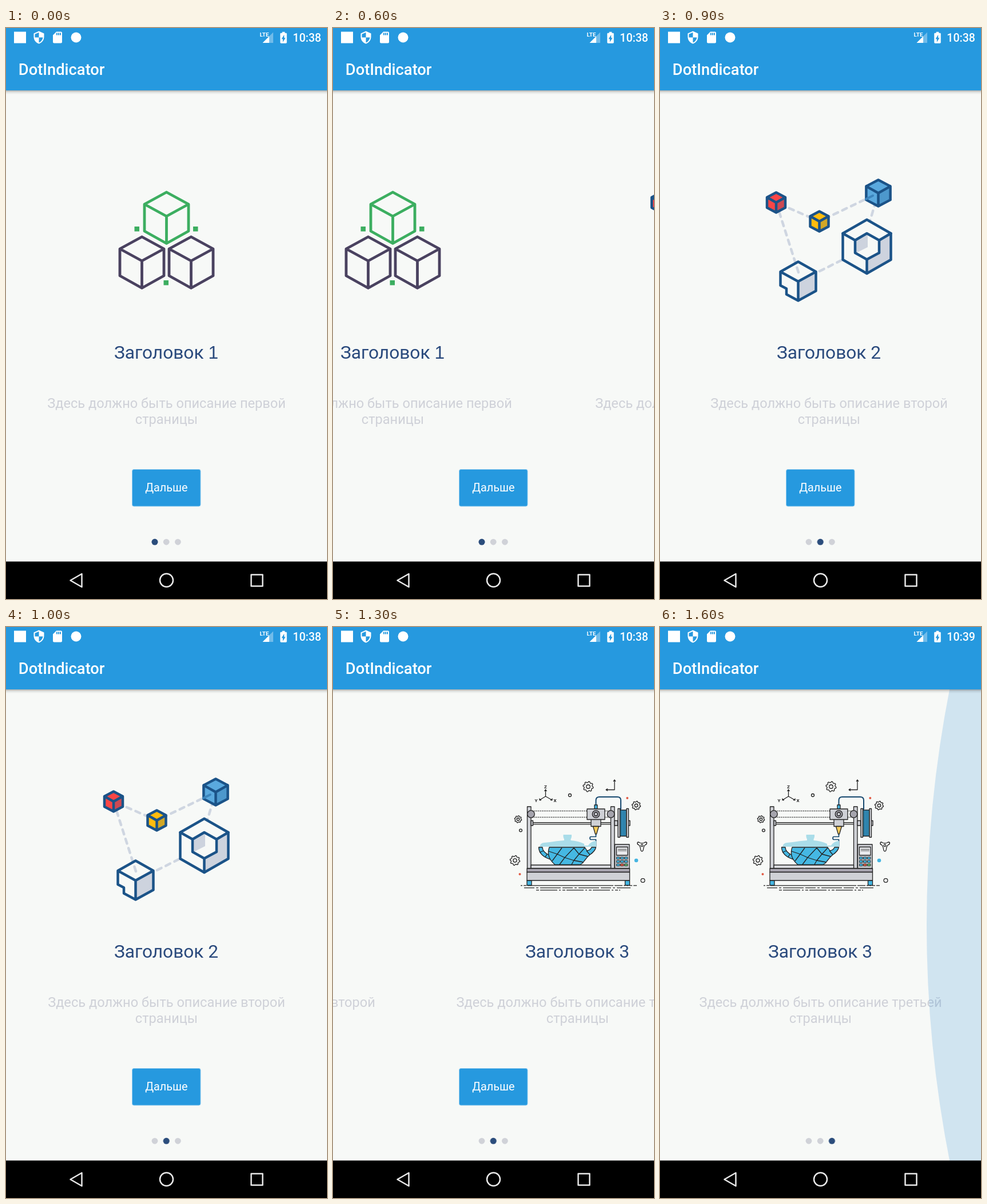
Write an HTML page that moves like this. It is 561 by 998 pixels and loops after 1700 ms.

```html
<!DOCTYPE html>
<html lang="ru">
<head>
<meta charset="utf-8">
<title>DotIndicator</title>
<style>
html, body { margin: 0; width: 100%; height: 100%; overflow: hidden; background: #f7f9f7; }
svg { display: block; width: 561px; height: 998px; }
text { font-family: Roboto, "Noto Sans", sans-serif; }
.head { font-size: 31.7px; fill: #2a4a7d; text-anchor: middle; }
.one { font-family: "Liberation Sans", Arial, sans-serif; }
.desc { font-size: 23.6px; fill: #cfd1d8; text-anchor: middle; }
.medium { font-weight: 500; fill: #fff; }
.axis text { font-size: 8px; font-weight: 700; fill: #222; stroke: none; text-anchor: middle; }

.pages, .active, .button, .before, .after, .glow { animation: 1700ms step-end infinite; }
.pages { animation-name: swipe; }
.active { animation-name: select; }
.button { animation-name: hide; }
.before { animation-name: leave; }
.after, .glow { animation-name: show; }

@keyframes swipe {
  0% { transform: translateX(0); }
  23.52% { transform: translateX(-31px); }
  29.4% { transform: translateX(-92px); }
  35.28% { transform: translateX(-176px); }
  41.16% { transform: translateX(-320px); }
  47.04% { transform: translateX(-468px); }
  52.92% { transform: translateX(-546px); }
  58.8% { transform: translateX(-561px); }
  64.68% { transform: translateX(-604px); }
  70.56% { transform: translateX(-768px); }
  76.44% { transform: translateX(-975px); }
  82.32% { transform: translateX(-1094px); }
  88.2%, 100% { transform: translateX(-1122px); }
}
@keyframes select {
  0% { transform: translateX(0); }
  52.92% { transform: translateX(20.2px); }
  82.32%, 100% { transform: translateX(40.4px); }
}
@keyframes hide { 0% { opacity: 1; } 82.32%, 100% { opacity: 0; } }
@keyframes leave { 0% { opacity: 1; } 94.1%, 100% { opacity: 0; } }
@keyframes show { 0% { opacity: 0; } 94.1%, 100% { opacity: 1; } }
</style>
</head>
<body>
<svg viewBox="0 0 561 998">
  <defs>
    <linearGradient id="shade" x2="0" y2="1">
      <stop offset="0" stop-color="#000" stop-opacity=".3"/>
      <stop offset=".45" stop-color="#000" stop-opacity=".09"/>
      <stop offset="1" stop-color="#000" stop-opacity="0"/>
    </linearGradient>
    <path id="frame" d="M0 0L38.5 21V68L0 89.5L-38.5 68V21ZM-38.5 21L0 42L38.5 21M0 42V89.5"/>
    <g id="cube">
      <path d="M0-17.5L16-9V9L0 17.5L-16 9V-9Z" stroke="none"/>
      <path d="M0 0L16-9V9L0 17.5Z" fill="#1b5388" fill-opacity=".2" stroke="none"/>
      <path d="M0-17.5L16-9V9L0 17.5L-16 9V-9ZM-16-9L0 0L16-9M0 0V17.5" fill="none" vector-effect="non-scaling-stroke"/>
    </g>
    <rect id="key" width="5.5" height="3.8"/>
    <clipPath id="area"><rect y="109" width="561" height="824"/></clipPath>
  </defs>

  <rect width="561" height="998" fill="#f7f9f7"/>

  <g clip-path="url(#area)">
    <g class="pages">
      <g>
        <g fill="none" stroke-width="4.8" stroke-linejoin="round">
          <use href="#frame" x="280.5" y="287" stroke="#3cae60"/>
          <g stroke="#4a4260">
            <use href="#frame" x="237.5" y="365"/>
            <use href="#frame" x="323.5" y="365"/>
          </g>
        </g>
        <path d="M224.5 347h8.5v8.5h-8.5zM327 347h8.5v8.5h-8.5zM275.5 441h8.5v8.5h-8.5z" fill="#3cae60"/>
        <text class="head" x="280" y="578">Заголовок <tspan class="one">1</tspan></text>
        <text class="desc" x="280.5" y="664">Здесь должно быть описание первой</text>
        <text class="desc" x="280.5" y="692">страницы</text>
      </g>

      <g transform="translate(561)">
        <path d="M227 427L188 305L263.5 338L366.5 288.5L352 337M302 406L256 429" fill="none" stroke="#cfd6e1" stroke-width="4.5" stroke-dasharray="8.5 8.5" stroke-linecap="round"/>
        <g stroke="#1b5388" stroke-width="4.5" stroke-linejoin="round" stroke-linecap="round">
          <use href="#cube" transform="translate(188 305)" fill="#fa4646"/>
          <use href="#cube" transform="translate(263.5 338)" fill="#ffbc0e"/>
          <use href="#cube" transform="translate(366.5 288.5) scale(1.32)" fill="#5aa9de"/>
          <path d="M345 299L357 293" stroke="#3c85bd" stroke-width="4"/>
          <g stroke="none" fill="#cdd3de">
            <path d="M388.5 359V405L346.5 429V404L368 393V371Z"/>
            <path d="M326 371L348 359V383L326 394Z"/>
            <path d="M226.5 443L257.5 426V459.5L226.5 476.5Z"/>
          </g>
          <g fill="none">
            <path d="M346.5 335L388.5 359V405L346.5 429L304.5 405V359Z"/>
            <path d="M346.5 359L368 371V393L346.5 404.5L326 393V371Z"/>
            <path d="M304.5 359L326 371M388.5 359L368 371M346.5 404.5V429"/>
            <path d="M226.5 408.5L257.5 426V459.5L226.5 476.5L206 465.5V455.5L195.5 450V426ZM195.5 426L226.5 443L257.5 426M226.5 443V476.5"/>
          </g>
        </g>
        <text class="head" x="280" y="578">Заголовок 2</text>
        <text class="desc" x="280.5" y="664">Здесь должно быть описание второй</text>
        <text class="desc" x="280.5" y="692">страницы</text>
      </g>

      <g transform="translate(1122)">
        <g stroke="#222" stroke-width="1.3" fill="none" stroke-linejoin="round">
          <path d="M202 321.5H297M202 332.5H297M328 321.5H338M328 332.5H338" stroke-width="1.6" stroke-dasharray="1.6 1.6"/>
          <path d="M199 342H352M199 344.8H352"/>

          <!-- posts, rod ends and wheels -->
          <g fill="#cfd1d6">
            <path d="M192.5 314h6.5v108h-6.5zM338.5 314h6.5v108h-6.5z"/>
            <path d="M199 338.5h3.5v8.5h-3.5zM345 338.5h5.5v8.5h-5.5zM369 338.5h3v8.5h-3z"/>
          </g>
          <g fill="#a5a4ad">
            <circle cx="199" cy="327" r="6.3"/>
            <circle cx="338.5" cy="327" r="6.3"/>
          </g>

          <!-- spool and cable -->
          <path d="M355 320h10.5v45.5H355z" fill="#45b5e1"/>
          <path d="M357.5 320v45M360.2 320v45M362.9 320v45" stroke="#15486e" stroke-width="1.2"/>
          <path d="M351 317.5h3.5v50H351zM366 317.5h3.5v50H366z" fill="#cfd1d6"/>
          <path d="M312.5 311V303q0-6 6-6h31.5q6 0 6 6V319" stroke="#15486e" stroke-width="2"/>

          <!-- print head -->
          <path d="M310 311h5v7h-5z" fill="#45b5e1"/>
          <path d="M297 318h31v18.5h-31zM304 336.5h17V348.5h-17z" fill="#cfd1d6"/>
          <circle cx="312.5" cy="327" r="6.3" fill="#a5a4ad"/>
          <circle cx="312.5" cy="327" r="3" fill="#cfd1d6"/>
          <path d="M307.5 348.5h10L313.5 362h-2z" fill="#f6cd5c"/>
          <path d="M312.5 362V366.5H304q-2 0-2 2.5t2 2.5h8.5V384" stroke="#15486e" stroke-width="1.7"/>

          <!-- teapot -->
          <path d="M214 384Q216 377 222 377L232 376Q243 374 257 373V371L255.5 367V363H270V367L268.5 371V373Q282 374 292 379V382H299Q304 374 313 374V384Z" fill="#aadde9" stroke="none"/>
          <path d="M212.500 385H219Q219 393 231 399L236 407Q213 401 212.500 385Z" fill="#45b8e3"/>
          <path d="M231 385H293L297 391Q303 390 305 385H312.500Q311 392 302 398Q297 402 292 409Q289 414 284 415.500H241Q225 402 231 385Z" fill="#45b8e3"/>
          <path d="M230 392L245 397L253 386M245 397L236 409M245 397L258 403L274 386M258 403L249 415M258 403L274 408L283 397L274 386M274 408L270 415M283 397L293 386M283 397L298 401M274 408L290 411M296 391L302 398M214 394L221 391M224 402L227 397"/>

          <!-- control panel -->
          <path d="M345.5 380H371V422H345.5z" fill="#cfd1d6"/>
          <path d="M348.5 384.5H368V399H348.5z" fill="#e9eaed"/>
          <path d="M351 388.5H366M351 391H366" stroke-width=".8"/>
          <g stroke-width=".9" fill="#45b5e1">
            <use href="#key" x="348.5" y="402"/><use href="#key" x="355.5" y="402"/><use href="#key" x="362.5" y="402"/>
            <use href="#key" x="348.5" y="408"/><use href="#key" x="355.5" y="408"/><use href="#key" x="362.5" y="408"/>
            <use href="#key" x="348.5" y="414"/>
            <use href="#key" x="355.5" y="414" fill="#e25b45"/>
            <use href="#key" x="362.5" y="414" fill="#5cb56d"/>
          </g>

          <!-- base -->
          <path d="M199 416H338.5V422H199z" fill="#d9dade"/>
          <path d="M192 443h8v8.5h-8zM363.5 443h8v8.5h-8z" fill="#45b5e1"/>
          <path d="M192 422H371.5V428.5H192z" fill="#a8a5b0"/>
          <path d="M192 428.5H371.5V443H192z" fill="#cfd1d6"/>
          <path d="M181 451.8H384" stroke-dasharray="3 2 5 2 150 2 14 2 3 2"/>
          <path d="M187 455.8H373" stroke-dasharray="18 3 4 3 36 3"/>
          <path d="M208 459.8H355" stroke-dasharray="5 2 30 3 3 3"/>

          <!-- floating marks -->
          <g id="gears"></g>
          <circle cx="267" cy="294" r="2.5"/>
          <circle cx="181" cy="355.5" r="2.4"/>
          <circle cx="394.5" cy="443" r="3.4"/>
          <path d="M345 267.5V284.5H330M343 270L345 267L347 270M333 282.5L330 284.5L333 286.5"/>
          <g class="axis">
            <path d="M224.5 296V284.5M224.5 296L214 302.5M224.5 296L236 302.5M222.5 287L224.5 284L226.5 287M214 299.5V302.5H217M233 302.5H236V299.5"/>
            <text x="224.5" y="282">Z</text>
            <text x="208" y="306">Y</text>
            <text x="241" y="306">X</text>
          </g>
          <path d="M385 377Q386 375 389 377Q393 379 397 377Q400 375 401.5 377Q401.5 380 398.5 381Q396 383 395.5 388Q395 392 393 392Q391 392 390.5 388Q390 383 387.5 381Q384.5 380 385 377Z"/>
          <circle cx="393" cy="382" r="1.8"/>
        </g>
        <g fill="#e25b45"><circle cx="367.3" cy="299" r="2"/><circle cx="179.5" cy="432" r="2"/></g>
        <circle cx="383" cy="408" r="3.3" fill="#45b5e1"/>
        <text class="head" x="280" y="578">Заголовок 3</text>
        <text class="desc" x="280.5" y="664">Здесь должно быть описание третьей</text>
        <text class="desc" x="280.5" y="692">страницы</text>
      </g>
    </g>
    <circle class="glow" cx="2603" cy="521" r="2137" fill="#2a8ad4" fill-opacity=".185"/>
  </g>

  <g class="button">
    <rect x="220.5" y="771.5" width="119.5" height="64.5" rx="3" fill="#2699df" stroke="#8fcbee"/>
    <text x="280.3" y="810.3" font-size="19.8" fill="#fff" text-anchor="middle">Дальше</text>
  </g>

  <g fill="#d0d2d8">
    <circle cx="260" cy="898.3" r="5.4"/>
    <circle cx="280.2" cy="898.3" r="5.4"/>
    <circle cx="300.4" cy="898.3" r="5.4"/>
  </g>
  <g class="active">
    <circle cx="260" cy="898.3" r="5.5" fill="#2b4d7c"/>
  </g>

  <rect y="109" width="561" height="7" fill="url(#shade)"/>
  <rect width="561" height="109" fill="#2699df"/>
  <text class="medium" x="21.8" y="81.7" font-size="27.3">DotIndicator</text>

  <g fill="#fff">
    <rect x="14" y="6.5" width="21" height="20"/>
    <path transform="translate(45.5 4.5)" d="M12 1L3 5v6c0 5.55 3.84 10.74 9 12 5.16-1.26 9-6.45 9-12V5l-9-4zm0 10.99h7c-.53 4.12-3.28 7.79-7 8.94V12H5V6.3l7-3.11v8.8z"/>
    <path transform="translate(78 4.5)" d="M18 2h-8L4 8V20c0 1.1.9 2 2 2h12c1.1 0 2-.9 2-2V4c0-1.1-.9-2-2-2zm-6 6h-2V4h2v4zm3 0h-2V4h2v4zm3 0h-2V4h2v4z"/>
    <circle cx="122.5" cy="16.5" r="9"/>
    <path d="M448.5 26L467 7.5V26Z" opacity=".35"/>
    <path d="M448.5 26L460 14.5V26Z"/>
    <text x="443.5" y="15" font-size="9.8" font-weight="700">LTE</text>
    <path transform="translate(471.2 4.7) scale(1.15 1)" d="M15.67 4H14V2h-4v2H8.33C7.6 4 7 4.6 7 5.33v15.33C7 21.4 7.6 22 8.33 22h7.33c.74 0 1.34-.6 1.34-1.33V5.33C17 4.6 16.4 4 15.67 4zM11 20v-5.5H9L13 7v5.5h2L11 20z"/>
  </g>
  <g font-size="19.5">
    <text class="medium before" x="501.3" y="24.3">10:38</text>
    <text class="medium after" x="501.3" y="24.3">10:39</text>
  </g>

  <rect y="932.5" width="561" height="66"/>
  <g fill="none" stroke="#e8e8e8" stroke-width="2.5" stroke-linejoin="round">
    <path d="M112.5 965.5L132.5 954V977Z"/>
    <circle cx="280.5" cy="965.3" r="11.5"/>
    <rect x="428.5" y="955.5" width="20" height="20"/>
  </g>
</svg>
<script>
// Outline of a gear with eight teeth and a round hole
function gear(x, y, r) {
  const teeth = 8, points = [];
  for (let i = 0; i < teeth * 4; i++) {
    const a = (i + 0.5) * Math.PI / (teeth * 2);
    const d = i % 4 < 2 ? r : r * 0.8;
    points.push((x + d * Math.cos(a)).toFixed(2) + ' ' + (y + d * Math.sin(a)).toFixed(2));
  }
  return `<path d="M${points.join('L')}Z"/><circle cx="${x}" cy="${y}" r="${r * 0.36}"/>`;
}
document.getElementById('gears').innerHTML =
  gear(299, 279, 9) + gear(383, 312, 7.6) + gear(176.5, 336, 6.2) + gear(171, 408, 8.6);
</script>
</body>
</html>
```
